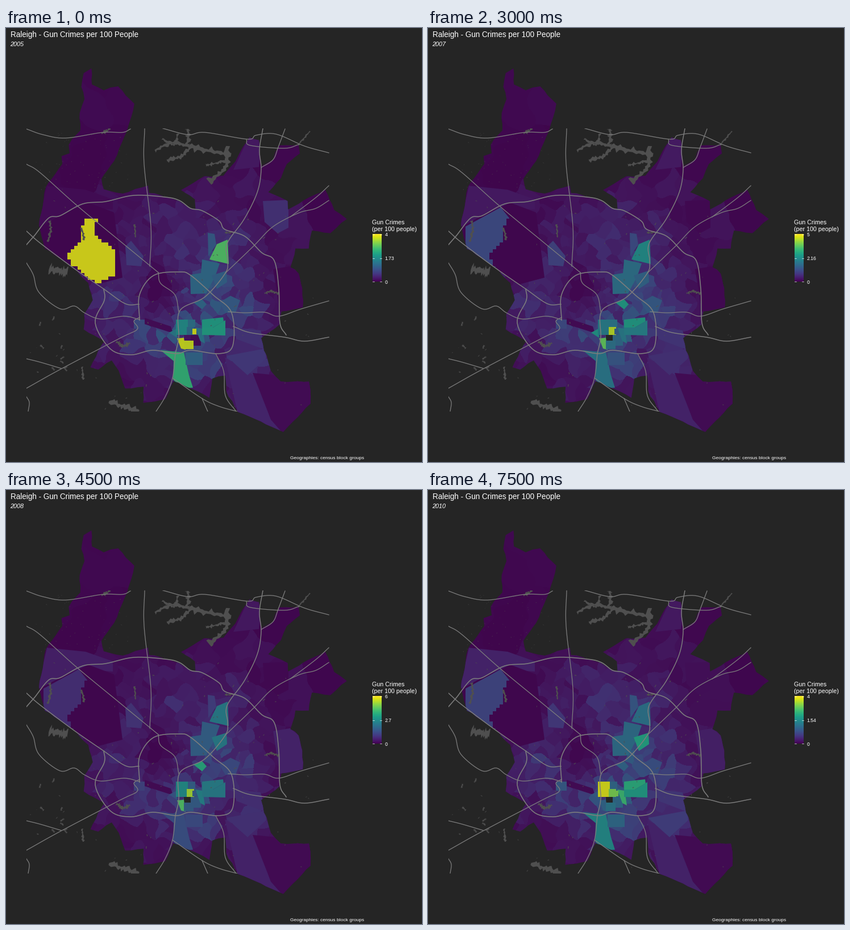
These frames come from a looping animation (732 px wide and 765 px high, 8 s). A matplotlib script:

```python
import numpy as np
import matplotlib.pyplot as plt
from matplotlib.animation import FuncAnimation
from matplotlib.collections import PolyCollection
from matplotlib.patches import Polygon, Rectangle

W, H, DPI = 732, 765, 96
BG = np.array([37, 37, 37]) / 255
WATER, ROAD = "#4f4f4f", "#7d7d7d"
NA = -1
YEARS = range(2005, 2011)
TOPS = ("4", "5", "5", "6", "4", "4")
MIDS = ("1.73", "2.36", "2.16", "2.7", "1.84", "1.54")
rng = np.random.default_rng(12)

fig = plt.figure(figsize=(W / DPI, H / DPI), dpi=DPI, facecolor=BG)
ax = fig.add_axes([0, 0, 1, 1])
ax.axis("off")


def shade(v):
    """Viridis at 85 % over the background; NA shows the background."""
    v = np.asarray(v, float)
    rgb = plt.cm.viridis(np.clip(v, 0, 1))[..., :3] * 0.85 + BG * 0.15
    return np.where(v[..., None] < 0, BG, rgb)


def resample(pts, step):
    """Closed polygon with a point about every step pixels."""
    out = []
    for a, b in zip(np.array(pts, float), np.roll(pts, -1, axis=0)):
        n = max(1, round(np.hypot(*(b - a)) / step))
        out += [a + (b - a) * i / n for i in range(n)]
    return np.array(out)


def rough(pts, step=11, amp=1):
    p = resample(pts, step)
    return p + rng.uniform(-amp, amp, p.shape)


def stairs(pts, step=6):
    """Polygon whose edges run only across and down."""
    p = np.round(resample(pts, step) / step) * step
    corner = np.c_[np.roll(p[:, 0], -1), p[:, 1]]
    return np.stack([p, corner], axis=1).reshape(-1, 2)


def smooth(pts, n=8):
    """Catmull-Rom curve through the points."""
    p = np.array(pts, float)
    p = np.vstack([2 * p[0] - p[1], p, 2 * p[-1] - p[-2]])
    t = np.linspace(0, 1, n, endpoint=False)[:, None]
    out = [0.5 * (2 * b + (c - a) * t + (2 * a - 5 * b + 4 * c - d) * t ** 2
                  + (3 * b - a - 3 * c + d) * t ** 3)
           for a, b, c, d in zip(p, p[1:], p[2:], p[3:])]
    return np.vstack(out + [p[-2:-1]])


# City limits, clockwise from the northern tip
north = [(133, 103), (137, 80), (150, 72), (152, 100), (172, 109), (197, 102), (226, 134),
         (214, 180), (190, 234), (167, 266), (171, 285), (205, 292), (249, 277), (252, 290),
         (280, 297), (305, 304), (322, 317), (334, 318), (333, 302), (308, 285), (350, 262),
         (382, 260), (403, 236), (428, 193), (445, 197), (450, 244), (470, 231), (480, 207)]
east = [(515, 206), (517, 222), (494, 240), (484, 264), (462, 290), (496, 304), (496, 320),
        (562, 284), (578, 320), (599, 336), (570, 361), (538, 358), (532, 388), (510, 389),
        (501, 421), (515, 432), (522, 460), (522, 492), (484, 500), (481, 523), (448, 546),
        (458, 578), (466, 605), (483, 623), (534, 624), (536, 662)]
south = [(488, 711), (408, 676), (387, 640), (386, 612), (363, 617), (358, 651), (295, 622),
         (280, 655), (241, 661), (243, 632), (210, 636), (198, 605), (185, 585), (163, 602),
         (148, 598), (172, 552), (137, 532), (138, 505), (152, 480), (145, 450)]
west = [(120, 423), (68, 388), (58, 348), (70, 280), (100, 240), (97, 225), (112, 220),
        (110, 205), (130, 180), (130, 150), (138, 125)]
city = Polygon(rough(north + east + south + west), fc="none", ec="none")
ax.add_patch(city)

# Block groups: nearest-seed cells, dense downtown and sparse outside
N, OUT = 350, 60
k = np.arange(N)
rad = np.r_[((k + 0.5) / N) ** 0.68 + rng.normal(0, 0.012, N), rng.uniform(1.05, 2.2, OUT)]
ang = np.r_[k * 2.39996 + rng.normal(0, 0.12, N), rng.uniform(0, 2 * np.pi, OUT)]
sx, sy = 315 + 215 * rad * np.cos(ang), 475 + 230 * rad * np.sin(ang)

yy, xx = np.mgrid[0:H, 0:W].astype(float)
wx = xx + 2.5 * np.sin(yy / 5.3) + 2 * np.sin((xx + yy) / 11)
wy = yy + 2.5 * np.sin(xx / 6.1) + 2 * np.sin((xx - yy) / 9)
near = np.full((H, W), 1e9)
cell = np.zeros((H, W), int)
for i in range(N + OUT):
    d = (wx - sx[i]) ** 2 + (wy - sy[i]) ** 2
    m = d < near
    near[m], cell[m] = d[m], i


def bump(x, y, r, h):
    return h * np.exp(-((sx - x) ** 2 + (sy - y) ** 2) / r ** 2)


level = (0.055 * np.exp(-rad ** 6) + bump(365, 470, 52, 0.17) + bump(320, 545, 48, 0.16)
         + bump(195, 490, 42, 0.1) + bump(315, 370, 42, 0.06) + bump(420, 520, 38, 0.09)
         + bump(245, 555, 35, 0.12) + bump(345, 595, 42, 0.09) + bump(395, 385, 38, 0.06)
         + bump(430, 590, 30, 0.1) + bump(272, 462, 38, -0.07) + rng.uniform(0, 0.02, N + OUT))
level = np.clip(level, 0, 1) * rng.uniform(0.5, 1.35, N + OUT)
gain = np.array([1, 0.9, 0.95, 0.8, 1, 0.95])[:, None]
cells = np.clip(level * gain * rng.uniform(0.75, 1.25, (6, N + OUT)), 0, 1)
base = ax.imshow(shade(cells[0])[cell], aspect="auto", interpolation="nearest", zorder=1)
base.set_clip_path(city)

# Block groups that stand out: one level that drifts, or a value per year
shapes, values = [], []


def area(pts, v):
    shapes.append(pts)
    values.append(v if np.ndim(v) else v * gain[:, 0] * rng.uniform(0.85, 1.15, 6))


def block(x0, y0, x1, y1, v):
    area([(x0, y0), (x1, y0), (x1, y1), (x0, y1)], v)


# edges of the city
area([(72, 278), (140, 285), (188, 302), (188, 320), (128, 316), (95, 331), (55, 352)],
     (.02, .09, .06, .08, .11, .09))
area([(55, 353), (95, 331), (145, 308), (190, 325), (205, 440), (160, 452), (68, 390)], 0)
area([(66, 350), (128, 316), (143, 335), (133, 391), (118, 422), (66, 388)],
     (0, 0, .23, .13, 0, .21))
area(stairs([(137, 338), (160, 336), (156, 368), (180, 382), (192, 402), (195, 436),
             (160, 450), (120, 418), (107, 402), (130, 372)]), (.96, 0, 0, 0, 0, 0))
area([(400, 250), (428, 190), (450, 195), (445, 245)], .06)
area([(452, 305), (497, 303), (497, 352), (478, 362), (455, 342)], (.14, .02, .01, .01, .02, .03))
area([(470, 425), (500, 420), (525, 440), (526, 495), (482, 500)], (.01, .1, .01, .09, .04, .08))
area([(385, 580), (440, 615), (466, 690), (488, 715), (408, 680)], (.1, .01, .09, .09, .09, .09))
area([(434, 608), (540, 618), (540, 665), (488, 715), (466, 690)], .02)
area([(387, 578), (456, 565), (458, 582), (425, 612)], .17)
area([(402, 528), (448, 533), (458, 568), (405, 548)], .15)

# corridor to the north-east
area([(355, 361), (367, 363), (370, 382), (356, 402)], .26)
area([(358, 408), (371, 381), (390, 373), (392, 416)], (.73, .76, .5, .43, .55, .39))
area([(345, 408), (376, 415), (368, 438), (352, 468), (325, 469), (324, 435), (343, 432)], .36)
area([(362, 436), (388, 428), (389, 448), (371, 460)], (.32, .22, .33, .43, .38, .59))
area([(330, 484), (345, 478), (353, 487), (345, 496)], (.34, .3, .56, .62, .46, .33))
area([(375, 484), (395, 472), (412, 480), (404, 502), (386, 502)], .28)

# west side
area([(210, 385), (220, 375), (242, 402), (238, 420), (212, 418)], .2)
area([(244, 511), (290, 526), (294, 538), (244, 522)], .02)
block(225, 514, 244, 530, .27)

# downtown and south
area([(272, 568), (313, 572), (322, 612), (329, 634), (312, 635), (294, 620), (295, 587)],
     (.66, .4, .41, .25, .27, .49))
block(316, 572, 346, 594, .33)
area([(287, 537), (300, 530), (301, 546)], (.42, .65, .54, .27, .65, .3))
block(299, 514, 320, 541, (.5, .45, .43, .5, .76, .95))
block(320, 514, 333, 527, .38)
block(325, 541, 343, 560, (.02, .3, .35, .3, .43, .35))
area([(333, 528), (346, 530), (350, 556), (342, 552)], (.4, .42, .42, .46, .67, .68))
area([(345, 514), (382, 510), (383, 517), (364, 528), (345, 528)], (.57, .76, .56, .44, NA, .63))
area([(345, 528), (364, 528), (386, 515), (386, 542), (345, 541)], (.58, .43, .45, .43, .92, .56))
block(318, 527, 331, 541, (.35, .02, .9, .87, .48, .8))
block(328, 530, 335, 540, (.94, .95, .3, .3, .48, .8))
block(313, 541, 325, 553, (.05, .08, NA, NA, .5, NA))
area([(301, 547), (313, 546), (316, 567), (308, 565)], (.93, .95, .76, .73, .7, .33))
block(313, 551, 330, 566, (.92, .4, .38, .3, .68, .4))

shades = [shade(v) for v in np.array(values).T]
groups = PolyCollection(shapes, facecolors=shades[0], edgecolors="none", zorder=2)
ax.add_collection(groups)
groups.set_clip_path(city)

# Roads and water end at a smaller map frame
window = Rectangle((36, 177), 533, 499, fc="none", ec="none")
ax.add_patch(window)


def lake(*pts, w=4):
    """Ragged strip of water up to w pixels wide."""
    c = smooth(pts, 10)
    d = np.gradient(c, axis=0)
    nrm = np.c_[-d[:, 1], d[:, 0]] / (np.hypot(*d.T)[:, None] + 1e-6)
    half = w * (0.15 + 0.75 * rng.uniform(0, 1, (2, len(c), 1)) ** 2)
    shore = np.vstack([c + nrm * half[0], (c - nrm * half[1])[::-1]])
    ax.add_patch(Polygon(shore, fc=WATER, ec="none", zorder=3)).set_clip_path(window)


def ponds(n, x0, x1, y0, y1, size):
    for p in rng.uniform((x0, y0), (x1, y1), (n, 2)):
        step = rng.uniform(-size, size, 2)
        lake(p - step, p, p + step, w=size * 0.7)


lake((262, 216), (290, 203), (322, 208), w=6)
lake((322, 208), (360, 217), (396, 224), w=12)
lake((283, 233), (308, 226), (327, 209), w=6)
lake((275, 195), (295, 205), (303, 186), w=4)
lake((319, 178), (321, 190), (317, 209), w=7)
lake((389, 208), (386, 246), (357, 271), w=9)
lake((352, 242), (370, 238), (388, 233), w=5)
lake((76, 424), (92, 429), (108, 432), w=14)
lake((76, 340), (79, 355), (74, 377), w=4)
lake((133, 352), (138, 374), w=4)
lake((194, 553), (206, 560), (218, 555), w=6)
lake((181, 659), (207, 667), (234, 676), w=9)
lake((134, 597), (136, 620), w=4)
lake((455, 468), (465, 464), (480, 468), w=4)
lake((385, 361), (400, 360), w=4)
lake((226, 346), (228, 369), w=4)
lake((168, 186), (184, 178), w=5)
lake((514, 206), (535, 182), w=3)

ponds(75, 50, 218, 184, 285, 0.8)
ponds(60, 36, 568, 280, 676, 1.4)
ponds(25, 160, 500, 290, 660, 2.2)
ponds(10, 45, 130, 480, 610, 4)


def road(*pts, lw=0.95):
    line, = ax.plot(*smooth(pts).T, color=ROAD, lw=lw, zorder=4)
    line.set_clip_path(window)


# outer loop and beltline
road((36, 382), (50, 366), (75, 335), (95, 331), (135, 310), (175, 306), (225, 295),
     (280, 298), (305, 304), (325, 318), (345, 322), (375, 340), (385, 355), (420, 367),
     (450, 396), (472, 410), (480, 460), (482, 520), (493, 541), lw=1.2)
road((235, 515), (235, 470), (260, 436), (305, 430), (325, 436), (365, 471), (397, 502),
     (399, 560), (375, 574), (325, 568), (300, 574), (258, 568), (220, 576), (184, 566),
     (157, 520), (173, 480), (172, 460), lw=1.2)
# from the west
road((36, 240), (60, 255), (125, 313), (200, 375), (268, 431))
road((268, 431), (272, 450), (297, 470), (304, 500))
road((36, 358), (60, 379), (120, 424), (172, 460), (210, 486), (234, 487), lw=1.1)
road((235, 510), (225, 517), (231, 531), (200, 547), (95, 602), (36, 635))
road((36, 583), (60, 589), (97, 600))
road((36, 414), (48, 435), (58, 466), (95, 495), (120, 490), (138, 502), (166, 513),
     (208, 508), (235, 514))
# north and east
road((244, 177), (243, 240), (255, 350), (253, 420))
road((452, 177), (446, 215), (449, 250), (442, 290), (419, 337), (389, 380), (390, 410),
     (386, 432), (350, 474), (306, 498), (304, 545), (298, 574), lw=1.1)
road((386, 432), (435, 385), (470, 350), (515, 326), (545, 318), (568, 304))
road((500, 333), (545, 299), (568, 278))
road((36, 178), (65, 188), (105, 194), (170, 184), (205, 184), (219, 178))
road((276, 177), (320, 188), (350, 184), (425, 196), (440, 189), (475, 187), (525, 208),
     (568, 220))
road((423, 197), (430, 207), (490, 212), (516, 205))
road((491, 178), (479, 210), (470, 232), (449, 246))
road((391, 500), (420, 502), (455, 501), (480, 508), (520, 495), (568, 481))
road((400, 526), (430, 537), (490, 545), (525, 552), (568, 545), lw=1.1)
# south
road((298, 574), (293, 617), (280, 650), (264, 676))
road((293, 617), (345, 653), (375, 667), (407, 676))
road((345, 653), (355, 676))
road((369, 574), (383, 605), (386, 648), (405, 676))
road((36, 650), (41, 660), (39, 676))


def text(x, y, s, px, **kw):
    return ax.text(x, y, s, color="white", family="Liberation Sans", size=px * 72 / DPI,
                   zorder=6, **kw)


text(7.5, 15.5, "Raleigh - Gun Crimes per 100 People", 13.5)
year = text(7.5, 32, "", 10.9, style="italic")
text(644, 346, "Gun Crimes", 10.6)
text(644, 358, "(per 100 people)", 10.6)
text(499.5, 759.5, "Geographies: census block groups", 8.35)
top = text(666.5, 367, "", 8.6)
mid = text(666.5, 409, "", 8.6)
text(666.5, 451, "0", 8.6)

ax.imshow(np.linspace(1, 0, 84)[:, None], cmap="viridis", aspect="auto",
          extent=(645, 661, 447, 363), zorder=5)
for y in (364, 405.5, 447):
    for x in (645, 658):
        ax.plot((x, x + 3), (y, y), color="white", lw=0.5, zorder=6)

ax.set_xlim(0, W)
ax.set_ylim(H, 0)


def draw(i):
    n = i // 3
    base.set_data(shade(cells[n])[cell])
    groups.set_facecolor(shades[n])
    year.set_text(str(YEARS[n]))
    top.set_text(TOPS[n])
    mid.set_text(MIDS[n])
    return base, groups, year, top, mid


anim = FuncAnimation(fig, draw, frames=16, interval=500, repeat=True, repeat_delay=0)
plt.show()
```
